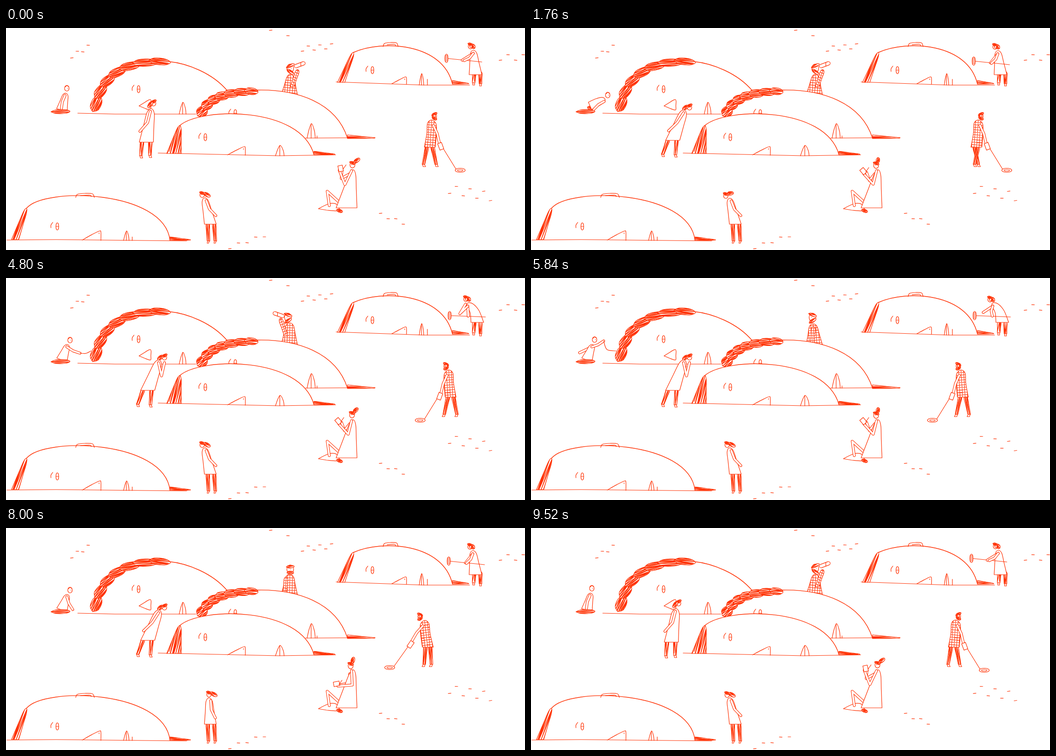
These frames come from a looping animation (1143 by 490 pixels, 9600 ms). An HTML page with a canvas:

```html
<!DOCTYPE html>
<html lang="en">
<head>
<meta charset="utf-8">
<title>Field study</title>
<style>
  html, body { margin: 0; width: 100%; height: 100%; overflow: hidden; background: #fff; }
  canvas { display: block; }
</style>
</head>
<body>
<canvas id="stage" width="1143" height="490"></canvas>
<script>
const ctx = document.getElementById('stage').getContext('2d');
const RED = '#ff2f00', LOOP = 9600, STEP = 80;

const noise = n => { const s = Math.sin(n * 127.1 + 3.7) * 43758.5; return s - Math.floor(s) - 0.5; };
const mix = (a, b, p) => a + (b - a) * p;
const ease = p => p * p * (3 - 2 * p);
const add = ([x, y], dx, dy) => [x + dx, y + dy];
const blend = (a, b, p) => Array.isArray(a) ? a.map((v, i) => blend(v, b[i], p)) : mix(a, b, p);
const along = ([a, b, c, d], t) => {
  const ab = blend(a, b, t), bc = blend(b, c, t), cd = blend(c, d, t);
  return blend(blend(ab, bc, t), blend(bc, cd, t), t);
};

// ---- Pen ----
function ink(width = 1.2, color = RED) {
  ctx.lineWidth = width;
  ctx.strokeStyle = color;
  ctx.stroke();
}
function paper() {
  ctx.fillStyle = '#fff';
  ctx.fill();
}
function trace(pts, smooth) {
  ctx.beginPath();
  ctx.moveTo(...pts[0]);
  for (let i = 1; i < pts.length; i++) {
    const a = pts[i - 1], b = pts[i], before = pts[i - 2] || a, after = pts[i + 1] || b;
    if (!smooth) ctx.lineTo(...b);
    else ctx.bezierCurveTo(a[0] + (b[0] - before[0]) / 6, a[1] + (b[1] - before[1]) / 6,
      b[0] - (after[0] - a[0]) / 6, b[1] - (after[1] - a[1]) / 6, ...b);
  }
}
const line = (...pts) => { trace(pts); ink(); };
const curve = (...pts) => { trace(pts, true); ink(); };
function shape(pts, smooth = true) {
  trace(pts, smooth);
  ctx.closePath();
  paper();
  ink();
}
function oval([x, y], rx, ry) {
  ctx.beginPath();
  ctx.ellipse(x, y, rx, ry, 0, 0, 7);
  paper();
  ink();
}
function box([x, y], w, h, angle) {
  ctx.save();
  ctx.translate(x, y);
  ctx.rotate(angle);
  ctx.beginPath();
  ctx.rect(-w / 2, -h / 2, w, h);
  paper();
  ink();
  ctx.restore();
}
// A body part narrowing from one end to the other; hemTilt 0 keeps its hem level.
function taper(from, to, w0, w1, bend = 0, hemTilt = 0) {
  const lean = Math.atan2(to[0] - from[0], from[1] - to[1]);
  const at = (f, side) => {
    const a = lean * mix(hemTilt, 1, f), w = side * mix(w0, w1, f), bow = bend * 4 * f * (1 - f);
    return add(blend(from, to, f), Math.cos(lean) * bow + Math.cos(a) * w, Math.sin(lean) * bow + Math.sin(a) * w);
  };
  return [at(0, -1), at(0.5, -1), at(0.87, -1), at(1, 0), at(0.87, 1), at(0.5, 1), at(0, 1)];
}
function leaf(from, to, width) {
  const len = Math.hypot(to[0] - from[0], to[1] - from[1]) || 1;
  const nx = (from[1] - to[1]) / len * width, ny = (to[0] - from[0]) / len * width;
  const at = (f, side) => add(blend(from, to, f), nx * side, ny * side);
  return [from, at(0.25, 1), at(0.75, 1), to, at(0.75, -1), at(0.25, -1), from];
}
// Clips to an outline and hatches it in its own rotated frame.
function hatched(pts, origin, angle, hatch, width) {
  ctx.save();
  shape(pts);
  ctx.clip();
  ctx.translate(...origin);
  ctx.rotate(angle);
  ctx.beginPath();
  hatch();
  ink(width);
  ctx.restore();
}
function scribble(pts) {
  const centre = [0, 1].map(c => pts.reduce((s, p) => s + p[c], 0) / pts.length);
  let xx = 0, yy = 0, xy = 0, reach = 0;
  for (const p of pts) {
    const dx = p[0] - centre[0], dy = p[1] - centre[1];
    xx += dx * dx; yy += dy * dy; xy += dx * dy;
    reach = Math.max(reach, Math.hypot(dx, dy));
  }
  hatched(pts, centre, Math.atan2(2 * xy, xx - yy) / 2, () => {
    for (let v = -reach, i = 0; v < reach; v += 1.9, i++)
      ctx.lineTo((i % 2 ? 1 : -1) * reach * (1 + noise(i) / 2), v + noise(i + 50) * 2.4);
  }, 1.5);
}
function plaid(pts) {
  const hem = blend(pts[0], pts[pts.length - 1], 0.5), top = pts[3];
  hatched(pts, hem, Math.atan2(top[0] - hem[0], hem[1] - top[1]), () => {
    for (let d = -88; d < 88; d += 5.5) {
      ctx.moveTo(d, -90); ctx.lineTo(d + 1, 90);
      ctx.moveTo(-90, d); ctx.lineTo(90, d + 1);
    }
  }, 1.1);
}

// ---- Scenery ----
function braid(path, count, wide, narrow) {
  for (let i = 0; i < count; i++) {
    const f = i / count, w = mix(wide, narrow, f);
    scribble(leaf(add(along(path, f), -w / 3, -w / 3), add(along(path, Math.min(1, f + 1.4 / count)), w / 3, w / 3), w));
  }
}
function eyes([x, y]) {
  curve([x - 10, y - 9], [x - 14, y - 3], [x - 14, y + 3]);
  oval([x, y], 3, 8);
  line([x - 3, y], [x + 3, y]);
}
function fin([x, y], w, h, tick) {
  curve([x - w / 2, y], [x - w / 4, y - h * 0.6], [x + 1, y - h], [x + w * 0.4, y - h * 0.5], [x + w / 2, y]);
  line([x, y - h], [x, y]);
  if (tick) line([x + 13, y], [x + 13, y - tick]);
}
function nose([x, y], w, h) {
  curve([x - w, y - 1], [x - w / 2, y - h * 0.6], [x - 3, y - h], [x, y - h + 3], [x, y]);
  line([x - 4, y - h + 4], [x - 4, y - h + 6]);
}
function handle([x, y], w) {
  curve([x - w / 2, y], [x - w * 0.4, y - 7], [x, y - 9], [x + w * 0.4, y - 8], [x + w / 2, y]);
  curve([x - w / 4, y - 4], [x + w / 4, y - 5], [x + w / 3, y - 2]);
}
function mound(m) {
  const [start, c1, c2, end] = m.back;
  ctx.beginPath();
  ctx.moveTo(...(m.braid ? m.braid[0] : add(m.face, -m.faceWidth, 0)));
  if (m.braid) ctx.bezierCurveTo(...m.braid.slice(1).flat());
  ctx.lineTo(...start);
  ctx.bezierCurveTo(...c1, ...c2, ...end);
  ctx.closePath();
  paper();
  ctx.beginPath();
  ctx.moveTo(...start);
  ctx.bezierCurveTo(...c1, ...c2, ...end);
  ink(1.4);
  line(...m.ground);
  if (m.tail) scribble([add(end, 0, -7), add(end, m.tail / 2, -4), add(end, m.tail, 0), add(end, 0, 1)]);
  eyes(m.eyes);
  fin(...m.fin);
  if (m.nose) nose(...m.nose);
  if (m.handle) handle(...m.handle);
  if (m.face) scribble(taper(m.face, start, m.faceWidth, 3));
  if (m.braid) braid(m.braid, 7, 10, 6);
}
const braidedBack = {
  back: [[358, 74], [400, 78], [455, 100], [487, 138]], ground: [[158, 188], [240, 190], [418, 190]],
  braid: [[194, 188], [200, 115], [250, 65], [360, 74]], eyes: [292, 135], fin: [[389, 190], 15, 26]
};
const braidedFront = {
  back: [[553, 137], [640, 135], [727, 164], [752, 243]], ground: [[660, 243], [813, 242]], tail: 60,
  braid: [[425, 197], [440, 150], [490, 140], [553, 139]], eyes: [505, 188], fin: [[672, 243], 18, 32, 5]
};
const mounds = [
  { back: [[383, 215], [430, 175], [648, 172], [678, 279]], ground: [[335, 276], [600, 282], [726, 280]], tail: 46,
    face: [370, 277], faceWidth: 16, eyes: [439, 241], fin: [[603, 282], 19, 23], nose: [[527, 281], 39, 19] },
  { back: [[765, 54], [830, 25], [962, 34], [983, 123]], ground: [[727, 119], [920, 126], [1021, 126]], tail: 36,
    face: [738, 120], faceWidth: 8, eyes: [807, 93], fin: [[915, 126], 10, 25, 13],
    nose: [[882, 124], 32, 16], handle: [[847, 41], 33] },
  { back: [[45, 398], [85, 350], [348, 358], [361, 468]], ground: [[2, 468], [110, 467], [398, 470]], tail: 45,
    face: [20, 467], faceWidth: 8, eyes: [113, 438], fin: [[265, 469], 12, 21, 8],
    nose: [[209, 469], 41, 21], handle: [[174, 374], 41] }
];
// Ground marks zigzag along a slanted band.
function specks(x, y, count, spread, slope, jag) {
  for (let i = 0; i < count; i++) {
    const u = i / (count - 1) * 2 - 1, tilt = noise(i);
    const at = [x + u * spread, y + u * slope + (i % 2 ? -jag : jag)];
    line(add(at, -3, -tilt), add(at, 3, tilt));
  }
}
function drawSpecks() {
  specks(163, 52, 4, 18, -10, 4);
  specks(602, 11, 2, 19, 6, 0);
  specks(685, 43, 6, 32, -3, 5);
  specks(1114, 65, 4, 25, 0, 6);
  specks(1022, 364, 7, 45, 8, 9);
  specks(850, 421, 4, 25, 9, -3);
  specks(531, 471, 5, 38, -13, 3);
}

// ---- People ----
function joint(from, to, bend) {
  const dx = to[0] - from[0], dy = to[1] - from[1], len = Math.hypot(dx, dy) || 1;
  return add(blend(from, to, 0.5), -dy / len * bend, dx / len * bend);
}
function limb(from, to, bend = 0) {
  trace([from, joint(from, to, bend), to]);
  ink(6);
  ink(3.8, '#fff');
}
function trousers(hip, feet, gap, dir) {
  feet.forEach((foot, i) => {
    scribble(taper(foot, add(hip, i ? gap : -gap, -4), 3, 4));
    shape([add(foot, -2, 0), add(foot, 2, 0), add(foot, 2 + dir * 4, 5), add(foot, -2 + dir * 2, 5)], false);
  });
}
// dir runs from -1 (left) through 0 (front) to 1 (right).
function head(at, dir, { size = 5, tail, beard, bare } = {}) {
  const k = size / 6, rel = (x, y) => add(at, x * k, y * k);
  oval(at, size, size * 1.25);
  ctx.fillStyle = RED;
  ctx.fillRect(at[0] + dir * 2 - 0.6, at[1] - 0.6, 1.3, 1.3);
  if (bare) return curve(rel(-5, -3), rel(0, -7), rel(5, -4));
  if (beard) scribble(leaf(rel(-6, 6 - 4 * dir), rel(6, 6 + 4 * dir), 3));
  scribble(leaf(rel(-7, -4 + 3 * dir), rel(7, -5 - 3 * dir), 2.5));
  if (tail) scribble(leaf(rel(-3 * dir, -5), add(at, ...tail), 3.5));
}
function headphones(at) {
  oval(at, 2, 3);
}

// Returns the blended pose for a time; keys are [ms, pose name], ending where they began.
const acting = (poses, ...keys) => t => {
  const i = keys.findIndex(k => k[0] > t), [from, a] = keys[i - 1], [to, b] = keys[i];
  const p = ease((t - from) / (to - from)), pose = {};
  for (const part in poses[a]) pose[part] = blend(poses[a][part], poses[b][part], p);
  return pose;
};

const kneel = { hip: [123, 181], width: 12, bend: 0, neck: [132, 144], head: [134, 133],
  hand: [122, 178], rear: [124, 170], rope: [122, 178], sag: 0 };
const sit = { ...kneel, neck: [136, 147], head: [141, 137] };
const kneelerPose = acting({
  kneel,
  crawl: { ...kneel, hip: [130, 172], width: 9, bend: -2, neck: [163, 157], head: [169, 148],
    hand: [138, 180], rear: [138, 176], rope: [138, 180] },
  reach: { ...kneel, hip: [131, 172], width: 9, bend: -4, neck: [167, 160], head: [176, 155],
    hand: [183, 183], rear: [139, 177], rope: [183, 183] },
  pull: { ...sit, hand: [163, 166], rear: [129, 177], rope: [187, 161], sag: 3 },
  lift: { ...sit, head: [140, 136], hand: [160, 139], rear: [107, 165], rope: [187, 161], sag: 10 },
  rest: { ...sit, hand: [147, 180], rear: [123, 178], rope: [147, 180] }
}, [0, 'kneel'], [700, 'kneel'], [1500, 'crawl'], [2000, 'crawl'], [2700, 'reach'], [3600, 'reach'], [4300, 'pull'],
  [5000, 'pull'], [5500, 'lift'], [6400, 'lift'], [7200, 'rest'], [8400, 'rest'], [9300, 'kneel'], [LOOP, 'kneel']);
function kneeler(t) {
  const p = kneelerPose(t), shoulder = add(p.neck, -2, 5);
  limb(shoulder, p.rear);
  scribble(taper([132, 183], p.hip, 5, 6));
  shape(taper(p.hip, p.neck, p.width, 5, p.bend, 1));
  scribble(leaf([99, 185], [141, 184], 4));
  limb(shoulder, p.hand, 2);
  curve(p.hand, joint(p.hand, p.rope, p.sag), p.rope);
  head(p.head, 1, { bare: true });
}

const peer = { hem: [312, 248], neck: [338, 181], head: [349, 175], tail: [-15, 5], hand: [303, 227], elbow: -3,
  feet: [[290, 279], [318, 280]] };
const leanerPose = acting({
  stand: { hem: [309, 252], neck: [320, 178], head: [325, 166], tail: [-12, 10], hand: [295, 228], elbow: -6,
    feet: [[297, 282], [317, 281]] },
  peer,
  ponder: { ...peer, hand: [349, 187], elbow: 29 }
}, [0, 'stand'], [500, 'stand'], [1300, 'peer'], [3500, 'peer'], [4300, 'ponder'], [6300, 'ponder'],
  [7100, 'peer'], [8500, 'peer'], [9300, 'stand'], [LOOP, 'stand']);
function leaner(t) {
  const p = leanerPose(t);
  trousers(p.hem, p.feet, 9, 0.5);
  shape(taper(p.hem, p.neck, 15.5, 7));
  limb(add(p.neck, -2, 6), p.hand, p.elbow);
  head(p.head, 1, { tail: p.tail });
}

const lowered = [[622, 165], [623, 165]];
const watcherPose = acting({
  right: { neck: [627, 102], shoulder: 6, head: [626, 89], dir: 1, arm: [[630, 130], [643, 92]], scope: [[639, 84], [655, 78]] },
  front: { neck: [626, 93], shoulder: 14, head: [627, 91], dir: 0, arm: [[613, 130], [617, 99]], scope: [[621, 90], [633, 90]] },
  left: { neck: [625, 99], shoulder: 7, head: [621, 87], dir: -1, arm: [[617, 128], [604, 89]], scope: [[609, 84], [592, 78]] },
  idle: { neck: [621, 101], shoulder: 7, head: [620, 87], dir: -1, arm: [[620, 143], [622, 107]], scope: lowered },
  face: { neck: [625, 102], shoulder: 7, head: [626, 91], dir: 0, arm: [[614, 143], [617, 108]], scope: lowered }
}, [0, 'right'], [1900, 'right'], [2500, 'front'], [3500, 'front'], [4100, 'left'], [5000, 'left'], [5500, 'idle'],
  [6700, 'idle'], [7300, 'face'], [8600, 'face'], [9200, 'right'], [LOOP, 'right']);
function watcher(t) {
  const p = watcherPose(t), [eye, lens] = p.scope, rim = blend(eye, lens, 0.65);
  plaid(taper([624, 148], p.neck, 18, p.shoulder));
  head(p.head, p.dir, { size: 7.5, beard: true });
  plaid(taper(...p.arm, 4, 4));
  trace([eye, lens]);
  ink(9);
  ink(6.6, '#fff');
  line(add(rim, 0, -4), add(rim, 0, 4));
}

const stoop = { hem: [1038, 98], neck: [1017, 55], bend: 5, head: [1011, 47], mic: [977, 83], pole: [1056, 86],
  rear: [1003, 80], hand: [1014, 83], elbow: 3 };
const listenerPose = acting({
  hold: { hem: [1034, 103], neck: [1029, 49], bend: 0, head: [1023, 40], mic: [970, 67], pole: [1048, 75],
    rear: [1005, 71], hand: [1009, 72], elbow: -3 },
  aim: { hem: [1034, 103], neck: [1028, 50], bend: 0, head: [1022, 41], mic: [975, 73], pole: [1054, 81],
    rear: [1012, 77], hand: [1014, 78], elbow: -3 },
  stoop,
  chin: { ...stoop, head: [1013, 46], rear: [1018, 84], hand: [1012, 58], elbow: -24 },
  beckon: { ...stoop, rear: [996, 76], hand: [1016, 84] }
}, [0, 'hold'], [800, 'hold'], [1400, 'aim'], [2000, 'aim'], [2700, 'stoop'], [3900, 'stoop'], [4400, 'chin'],
  [5000, 'chin'], [5500, 'beckon'], [6300, 'beckon'], [6800, 'stoop'], [7100, 'stoop'], [7700, 'aim'],
  [8400, 'aim'], [9200, 'hold'], [LOOP, 'hold']);
function listener(t) {
  const p = listenerPose(t), shoulder = add(p.neck, 0, 7);
  trousers([1038, 100], [[1030, 121], [1045, 123]], 6.5, 0);
  shape(taper(p.hem, p.neck, 14, 6, p.bend));
  line(p.mic, p.pole);
  oval(p.mic, 3.5, 9.5);
  for (let y = -6; y <= 6; y += 3) line(add(p.mic, -3, y), add(p.mic, 3, y - 1));
  limb(shoulder, p.rear);
  limb(shoulder, p.hand, p.elbow);
  head(p.head, -1, { tail: [9, 5] });
  headphones(add(p.head, 1, 1));
}

const sketchBook = { head: [760, 303], tail: [5, -17], hand: [733, 322], elbow: -27, book: [732, 316], turn: -0.7 };
const sketcherPose = acting({
  raise: { head: [763, 302], tail: [16, -14], hand: [734, 314], elbow: -31, book: [737, 310], turn: -0.2 },
  sketchBook,
  glance: { ...sketchBook, head: [762, 302], tail: [13, -15] },
  rest: { head: [759, 304], tail: [7, -19], hand: [731, 349], elbow: -22, book: [728, 344], turn: -1.75 }
}, [0, 'raise'], [600, 'raise'], [1200, 'sketchBook'], [3600, 'sketchBook'], [4100, 'glance'], [5000, 'glance'],
  [5500, 'sketchBook'], [6400, 'sketchBook'], [7200, 'rest'], [8500, 'rest'], [9300, 'raise'], [LOOP, 'raise']);
function sketcher(t) {
  const p = sketcherPose(t);
  shape([[688, 399], [711, 388], [728, 389], [733, 403], [706, 402]]);
  limb([712, 392], [731, 382], -30);
  limb([757, 322], add(p.hand, 6, -3), p.elbow * 0.6);
  shape(taper([750, 397], [765, 313], 23, 5));
  scribble(leaf([728, 401], [741, 406], 3));
  limb([761, 315], p.hand, p.elbow);
  box(p.book, 10, 13, p.turn);
  line(add(p.book, 5, 2), add(p.book, 12, -8));
  head(p.head, -1, { size: 5.5, tail: p.tail });
}

const strollerPose = acting({
  look: { neck: [437, 375], head: [432, 368], tail: [18, 4], hand: [462, 414] },
  down: { neck: [437, 376], head: [429, 370], tail: [17, -6], hand: [462, 414] },
  upright: { neck: [447, 375], head: [447, 367], tail: [18, 4], hand: [461, 419] }
}, [0, 'look'], [900, 'look'], [1400, 'down'], [2200, 'down'], [2800, 'look'], [6300, 'look'],
  [7200, 'upright'], [8500, 'upright'], [9400, 'look'], [LOOP, 'look']);
function stroller(t) {
  const p = strollerPose(t);
  trousers([451, 433], [[446, 470], [461, 470]], 7, -0.5);
  shape(taper([450, 433], p.neck, 13, 6));
  limb(add(p.neck, 4, 6), p.hand, 4);
  head(p.head, -1, { tail: p.tail });
}

// The detectorist is drawn facing right around x = 0, then moved and mirrored.
const detectorPose = acting({
  walk: { neck: [4, 203], head: [10, 194], grip: [24, 261], turn: -0.35, ring: [67, 314] },
  search: { neck: [7, 204], head: [17, 195], grip: [38, 257], turn: -0.6, ring: [84, 308] }
}, [0, 'walk'], [1840, 'walk'], [2400, 'search'], [4000, 'search'], [4500, 'walk'], [6660, 'walk'],
  [7200, 'search'], [8700, 'search'], [9200, 'walk'], [LOOP, 'walk']);
const WALK = 2000, STRIDE = 520, GO_LEFT = 4660, GO_RIGHT = 9440;
function detectorist(t) {
  const p = detectorPose(t), left = t >= GO_LEFT && t < GO_RIGHT;
  const elapsed = (t - (left ? GO_LEFT : GO_RIGHT) + LOOP) % LOOP;
  const walked = Math.min(1, elapsed / WALK);
  const stride = walked < 1 ? 14 * Math.cos((elapsed - 150) / STRIDE * Math.PI) : 8;
  ctx.save();
  ctx.translate(mix(929, 983, left ? 1 - walked : walked), 0);
  if (left) ctx.scale(-1, 1);
  trousers([0, 262], [[-stride, 301], [stride, 301]], 5, 0.7);
  plaid(taper([0, 263], p.neck, 12, 9, 2));
  limb(add(p.neck, 4, 12), add(p.grip, -3, -8), -2);
  line(add(p.grip, 5, 4), add(p.ring, -9, -2));
  box(p.grip, 9, 15, p.turn);
  oval(p.ring, 11, 4.5);
  oval(p.ring, 6, 2);
  head(p.head, 1, { beard: true });
  headphones(p.head);
  ctx.restore();
}

function render(t) {
  ctx.fillStyle = '#fff';
  ctx.fillRect(0, 0, 1143, 490);
  drawSpecks();
  mound(braidedBack);
  shape([[293, 172], [301, 167], [318, 158], [319, 172], [318, 181], [305, 177]]);
  kneeler(t);
  watcher(t);
  mound(braidedFront);
  mounds.forEach(mound);
  [leaner, listener, detectorist, sketcher, stroller].forEach(person => person(t));
}

ctx.lineJoin = ctx.lineCap = 'round';
let shown = -1;
function tick() {
  const t = Math.floor(performance.now() % LOOP / STEP) * STEP;
  if (t !== shown) render(shown = t);
  requestAnimationFrame(tick);
}
tick();
</script>
</body>
</html>
```
